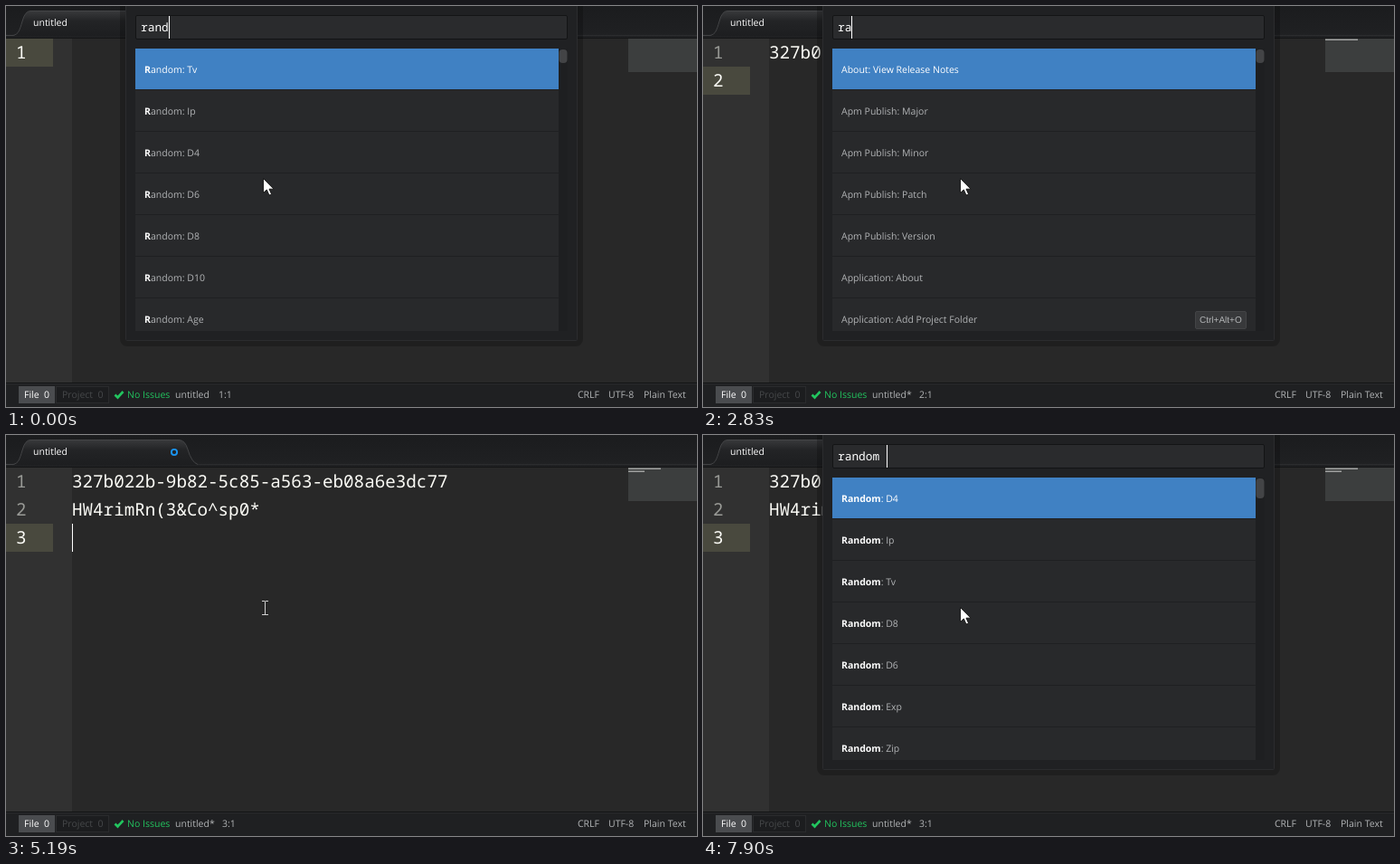
Animation, 764 px wide and 443 px high, one loop 8 s. Source, as an HTML page:

```html
<!DOCTYPE html>
<html lang="en">
<head>
<meta charset="utf-8">
<title>Random text in an editor</title>
<style>
  html, body { margin: 0; width: 100%; height: 100%; overflow: hidden; background: #282828; }
  svg { display: block; width: 764px; height: 443px; }
  text { white-space: pre; text-rendering: geometricPrecision; font: 10.5px "Open Sans", "Noto Sans", sans-serif; fill: #b2b4b6; }
  .code { font: 19.24px "Noto Sans Mono", monospace; fill: #fbfbf6; }
  .num { fill: #999a96; }
  .input { font: 500 12.83px "Noto Sans Mono", monospace; fill: #fff; }
  .key { font: 10px "Liberation Sans", Arial, sans-serif; }
  .hit { font-weight: 700; fill: #fff; }
  .on { fill: #fff; }
  .off { fill: #46484a; }
  .ok { fill: #22c55f; }
</style>
</head>
<body>
<svg viewBox="0 0 764 443">
  <defs>
    <linearGradient id="tabFill" x2="0" y2="1">
      <stop offset="0" stop-color="#38393b"/>
      <stop offset=".4" stop-color="#232426"/>
      <stop offset="1" stop-color="#1d1e20"/>
    </linearGradient>
    <linearGradient id="barFill" x2="0" y2="1">
      <stop offset="0" stop-color="#1b1c1e"/>
      <stop offset="1" stop-color="#202123"/>
    </linearGradient>
    <clipPath id="listClip"><rect x="143" y="47" width="478" height="312"/></clipPath>
  </defs>

  <rect width="764" height="443" fill="#282828"/>
  <rect y="36" width="73" height="380" fill="#313131"/>
  <rect x="688" y="36" width="76" height="37" fill="#3c3e3e"/>

  <rect width="764" height="36" fill="url(#barFill)"/>
  <path d="M0 32.5H764" stroke="#2c2d2f"/>
  <path d="M0 35.5H764" stroke="#141516"/>
  <path d="M8 33C14 31 15 27 18 17Q21 5.500 27 5.500H191Q198 5.500 201 16Q205 30 212 33Z" fill="url(#tabFill)"/>
  <path d="M0 32.500H8C14 31 15 27 18 17Q21 5.500 27 5.500H191Q198 5.500 201 16Q205 30 212 32.500" fill="none" stroke="#434446"/>
  <text x="30" y="22" class="on">untitled</text>

  <rect y="416" width="764" height="27" fill="#1f2022"/>
  <path d="M0 416.5H764" stroke="#111213"/>
  <path d="M0 417.5H764" stroke="#2a2b2d"/>
  <rect x="14" y="420" width="40" height="19" fill="#4a4c4f"/>
  <rect x="55.5" y="420.5" width="58" height="18" fill="#1c1d1f" stroke="#2a2b2d"/>
  <text x="20" y="433" class="on">File  0</text>
  <text x="62" y="433" class="off">Project  0</text>
  <path d="M120.500 429.500L123.500 432.500L129.500 426" fill="none" stroke="#22c55f" stroke-width="2.600"/>
  <text x="134" y="433" class="ok">No Issues</text>
  <text x="632" y="433">CRLF</text>
  <text x="666" y="433">UTF-8</text>
  <text x="705" y="433">Plain Text</text>

  <g id="editor"></g>
  <g id="palette"></g>
  <path id="arrow" d="M284.500 190.500V206.500L288.300 203L291 209L293.600 207.900L291 202.200H296Z" fill="#fff" stroke="#111" stroke-width=".9"/>
  <path id="beam" d="M283 183.500H286L286.500 184L287 183.500H290M286.500 184V198M283 198.500H290" fill="none" stroke="#d0d0d0"/>
</svg>

<script>
const LOOP = 8000;
const byId = id => document.getElementById(id);
const DOC = ["327b022b-9b82-5c85-a563-eb08a6e3dc77", "HW4rimRn(3&Co^sp0*", ""];
const named = words => words.split(" ").map(w => "Random: " + w);

// rows of each result list and the bottom of its scroll thumb
const LISTS = {
  all: { thumb: 63, rows: ["About: View Release Notes", "Apm Publish: Major", "Apm Publish: Minor",
    "Apm Publish: Patch", "Apm Publish: Version", "Application: About", "Application: Add Project Folder"] },
  r: { thumb: 63, rows: named("Tv Ip D4 D6 D8 D10 Age") },
  random: { thumb: 70, rows: named("D4 Ip Tv D8 D6 Exp Zip") },
  g: { thumb: 200, rows: named("Guid Age String Gender Hashtag Paragraph Geohash") },
  guid: { rows: named("Guid") },
  s: { thumb: 180, rows: named("Ssn State String Street Sentence Syllable Address") },
  st: { thumb: 238, rows: named("State String Street Postal Sentence Lastname Firstname") },
  str: { rows: named("String Street") },
  string: { rows: named("String") }
};

// [start, lines, cursor position, modified, typed text, list, matched query]
const STEPS = [
  [0, 0, "1:1", 0, "rand", "r", "r"],
  [160, 0, "1:1", 0, "rando", "random", "rando"],
  [310, 0, "1:1", 0, "random ", "random", "random"],
  [430, 0, "1:1", 0, "random g", "g", "random g"],
  [580, 0, "1:1", 0, "random gu", "guid", "random gu"],
  [730, 0, "1:1", 0, "random gui", "guid", "random gui"],
  [880, 0, "1:1", 0, "random guid", "guid", "random guid"],
  [1160, 1, "1:37", 0],
  [1440, 1, "1:37", 1],
  [1590, 2, "1:37", 1],
  [1710, 2, "2:1", 1],
  [2830, 2, "2:1", 1, "ra", "all", ""],
  [3230, 2, "2:1", 1, "ran", "r", "ra"],
  [3350, 2, "2:1", 1, "rand", "r", "ran"],
  [3470, 2, "2:1", 1, "rando", "random", "rando"],
  [3620, 2, "2:1", 1, "random ", "random", "random"],
  [3740, 2, "2:1", 1, "random s", "s", "random s"],
  [3890, 2, "2:1", 1, "random st", "st", "random st"],
  [4020, 2, "2:1", 1, "random str", "str", "random str"],
  [4170, 2, "2:1", 1, "random stri", "string", "random stri"],
  [4290, 2, "2:1", 1, "random string", "string", "random string"],
  [4570, 2, "2:19", 1],
  [5190, 3, "3:1", 1],
  [6160, 3, "3:1", 1, "r", "all", ""],
  [6590, 3, "3:1", 1, "ra", "r", "r"],
  [6870, 3, "3:1", 1, "ran", "r", "ra"],
  [6990, 3, "3:1", 1, "ran", "r", "ran"],
  [7270, 3, "3:1", 1, "rand", "r", "ran"],
  [7390, 3, "3:1", 1, "rand", "r", "rand"],
  [7510, 3, "3:1", 1, "rando", "random", "rand"],
  [7630, 3, "3:1", 1, "rando", "random", "rando"],
  [7750, 3, "3:1", 1, "random", "random", "random"],
  [7900, 3, "3:1", 1, "random ", "random", "random"]
];

const esc = s => s.replace(/&/g, "&amp;").replace(/</g, "&lt;");
const rect = (x, y, w, h, fill, more = "") =>
  `<rect x="${x}" y="${y}" width="${w}" height="${h}" fill="${fill}" ${more}/>`;
const text = (x, y, body, cls = "") => `<text x="${x}" y="${y}" class="${cls}">${body}</text>`;

// indexes of the letters of word that the query hits, joined runs first
function hits(word, query, from) {
  const low = word.toLowerCase(), found = [];
  const run = low.indexOf(query, from);
  let at = run < 0 ? from : run;
  for (const c of query) {
    at = low.indexOf(c, at);
    if (at < 0) break;
    found.push(at++);
  }
  return found;
}

function label(word, query) {
  const [head, tail = ""] = query.split(" ");
  const set = new Set([...hits(word, head, 0), ...hits(word, tail, 8)]);
  const parts = [];
  [...word].forEach((c, i) => {
    const hit = set.has(i), last = parts[parts.length - 1];
    if (last && last.hit === hit) last.s += c;
    else parts.push({ hit, s: c });
  });
  return parts.map(p => p.hit ? `<tspan class="hit">${p.s}</tspan>` : p.s).join("");
}

function drawEditor(lines, pos, dirty, open, filled) {
  const rows = Math.max(lines, 1), top = 36 + 31 * (rows - 1);
  let out = rect(0, top, 52, 31, "#49493e");
  for (let i = 0; i < rows; i++) {
    const line = i < filled ? DOC[i] : "";
    out += text(11, 58 + 31 * i, i + 1, i === rows - 1 ? "code" : "code num");
    out += text(73, 58 + 31 * i, esc(line), "code");
    if (line) out += rect(688, 36.5 + 3 * i, line.length, 1.5, "#a0a1a0");
    if (i === rows - 1 && !open)
      out += rect(Math.round(73 + 11.545 * line.length), top, 1, 31, "#fff");
  }
  if (dirty) out += '<circle cx="186" cy="19" r="3.100" fill="none" stroke="#1a94f0" stroke-width="1.900"/>';
  out += text(187, 433, dirty ? "untitled*" : "untitled");
  return out + text(dirty ? 239 : 235, 433, pos);
}

function drawPalette(typed, list, query) {
  const { rows, thumb } = LISTS[list];
  const bottom = Math.min(359, 46 + 46 * rows.length), wide = thumb ? 468 : 478;
  let out = rect(126, -20, 512, bottom + 37, "#000", 'rx="8" fill-opacity=".22"')
    + rect(132.5, -20, 499, bottom + 30.5, "#202123", 'rx="1" stroke="#2b2c2e"')
    + rect(143.5, 10.5, 477, 26, "#2a2b2d", 'rx="1.500" stroke="#131415"')
    + text(149, 28, typed, "input")
    + rect(Math.round(149 + 7.7 * typed.length), 11, 1, 25, "#fff")
    + '<g clip-path="url(#listClip)">';
  rows.forEach((row, i) => {
    const y = 47 + 46 * i;
    out += rect(143, y, wide, 45, i ? "#28292b" : "#4081c3")
      + rect(143, y + 45, wide, 1, rows.length > 1 ? "#1f2022" : "none")
      + text(153, y + 27, label(row, query), i ? "" : "on");
  });
  if (list === "all")
    out += rect(544.5, 337.5, 56, 19, "#38393b", 'rx="1.500" stroke="#434446"') + text(549, 350, "Ctrl+Alt+O", "key");
  out += "</g>";
  if (thumb)
    out += rect(611, 47, 10, 312, "#1e1f21") + rect(611.5, 48, 9, thumb - 48, "#434446", 'rx="4"');
  return out;
}

function show([start, lines, pos, dirty, typed, list, query]) {
  const open = typed !== undefined;
  const filled = start < 1160 ? 0 : start < 4570 ? 1 : 2;
  byId("editor").innerHTML = drawEditor(lines, pos, dirty, open, filled);
  byId("palette").innerHTML = open ? drawPalette(typed, list, query) : "";
  const over = open && LISTS[list].rows.length > 2;
  byId("arrow").style.display = over ? "" : "none";
  byId("beam").style.display = over ? "none" : "";
}

let current;
function tick() {
  const t = performance.now() % LOOP;
  const step = STEPS.filter(s => s[0] <= t).pop();
  if (step !== current) show(current = step);
  requestAnimationFrame(tick);
}
tick();
</script>
</body>
</html>
```
